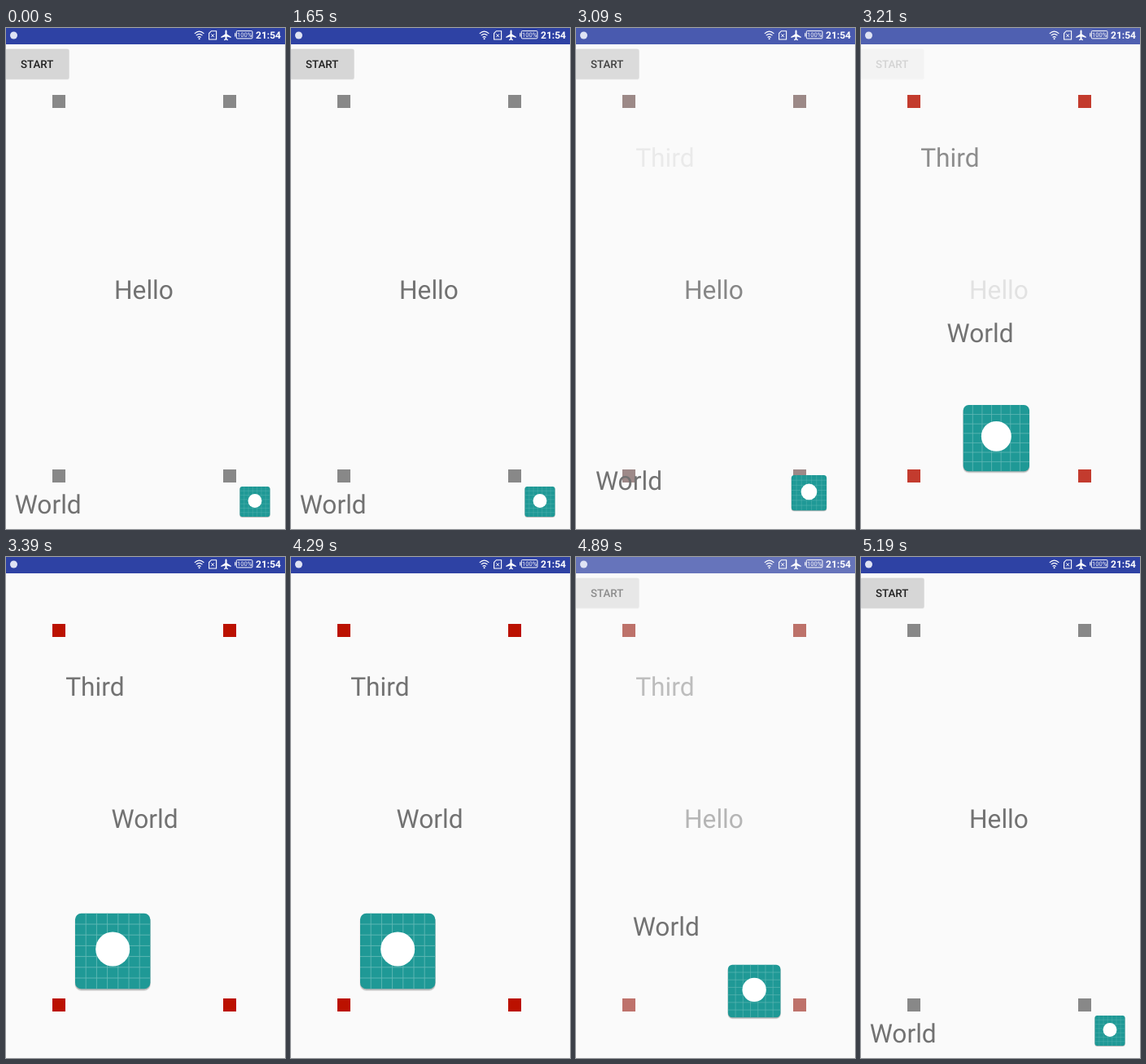
Animation of 343x614 px, one loop 6.75 s. Source, as an HTML page:

```html
<!DOCTYPE html>
<html lang="en">
<head>
<meta charset="utf-8">
<title>Shared element transition</title>
<style>
html, body { margin: 0; width: 100%; height: 100%; overflow: hidden; background: #fafafa; }
svg { display: block; width: 100vw; height: 100vh; }
text { font-family: Roboto, sans-serif; text-rendering: geometricPrecision; }
.big { font-size: 31.7px; fill: #727272; }
</style>
</head>
<body>
<svg viewBox="0 0 343 614">
  <defs>
    <g id="page">
      <rect width="343" height="20" fill="#2e42a4"/>
      <path d="M57 82h16v16h-16zM267 82h16v16h-16zM57 541h16v16h-16zM267 541h16v16h-16z"/>
    </g>
  </defs>
  <rect width="343" height="614" fill="#fafafa"/>

  <g id="first">
    <use href="#page" fill="#888"/>
    <rect x="-1" y="25.5" width="79" height="38" rx="2.5" opacity=".05"/>
    <rect x="-.5" y="26" width="78" height="36.7" rx="2" opacity=".1"/>
    <rect x="0" y="25.7" width="77" height="36" rx="2" fill="#d6d6d6"/>
    <text x="38.2" y="49" font-size="13.3" font-weight="500" text-anchor="middle" fill="#212121">START</text>
    <text class="big" x="133" y="332.2">Hello</text>
  </g>

  <g id="second">
    <use href="#page" fill="#bb1100"/>
    <text class="big" x="73.2" y="170.4">Third</text>
  </g>

  <g id="status" fill="none" stroke="#fff">
    <circle cx="9.5" cy="9" r="4.5" fill="#dfe3f4" stroke="none"/>
    <path d="M231.8 6.8q5.8-5.4 11.6 0M233.7 9.2q3.9-3.7 7.8 0M235.6 11.5q2-1.9 4 0" stroke-width="1.1"/>
    <circle cx="237.6" cy="13.2" r="1" fill="#fff" stroke="none"/>
    <path d="M252.4 3.7h6.2v10.3h-9v-7.5z" stroke-width="1.1"/>
    <path d="M252.3 7.4l3.6 3.8M255.9 7.4l-3.6 3.8"/>
    <path d="M270.5 2.6q1 0 1 1.3v3.6l5.2 3.2v1.3l-5.2-1.5v2.7l1.5 1.1v1l-2.5-.7-2.5.7v-1l1.5-1.1v-2.7l-5.2 1.5v-1.3l5.2-3.2v-3.6q0-1.3 1-1.3z" fill="#fff" stroke="none"/>
    <rect x="283.3" y="3.6" width="19.6" height="9.3" rx="1"/>
    <path d="M281.8 6.2v4.2" stroke-width="1.2"/>
    <g fill="#fff" stroke="none">
      <text x="293.2" y="11" font-size="7.6" text-anchor="middle">100%</text>
      <text x="322.5" y="13" font-size="12" font-weight="700" text-anchor="middle">21:54</text>
    </g>
  </g>

  <text id="world" class="big">World</text>

  <g id="tile">
    <rect x="-46.7" y="-44.5" width="93.4" height="93.4" rx="8" opacity=".1"/>
    <rect x="-46.2" y="-44.7" width="92.4" height="92.4" rx="7.5" opacity=".2"/>
    <rect x="-46.2" y="-46.2" width="92.4" height="92.4" rx="7.5" fill="#1f9996"/>
    <path id="grid" stroke="#62b9b6" stroke-width=".9"/>
    <circle cy="-2.5" r="21" fill="#fff"/>
  </g>
</svg>
<script>
const LOOP = 6750, STEP = 30;
const el = id => document.getElementById(id);
const mix = (a, b, p) => a + (b - a) * p;

let lines = '';
for (let i = 1; i < 7; i++) {
  const c = (i - 3.5) * 13.2;
  lines += `M${c} -46.2v92.4M-46.2 ${c}h92.4`;
}
el('grid').setAttribute('d', lines);

// Cubic bezier (0.4, 0, 0.2, 1), solved by bisection
function ease(x) {
  if (x <= 0) return 0;
  if (x >= 1) return 1;
  let lo = 0, hi = 1;
  for (let i = 0; i < 24; i++) {
    const s = (lo + hi) / 2, r = 1 - s;
    if (1.2 * s * r * r + 0.6 * s * s * r + s ** 3 < x) lo = s;
    else hi = s;
  }
  return 3 * lo * lo - 2 * lo ** 3;
}

// The leaving page fades slightly ahead of the entering one
const leave = p => 1 - p ** 0.85;

function render(ms) {
  const t = Math.floor(ms % LOOP / STEP) * STEP;
  const out = ease((t - 3023) / 360);
  const back = ease((t - 4746) / 410);
  const p = out - back;

  el('first').setAttribute('opacity', back || leave(out));
  el('second').setAttribute('opacity', back ? leave(back) : out);
  el('world').setAttribute('transform',
    `translate(${mix(10.7, 129.5, p)} ${mix(595.1, 332.1, p)})`);
  el('tile').setAttribute('transform',
    `translate(${mix(306, 131.2, p)} ${mix(580.5, 483, p)}) scale(${mix(37.3, 93, p) / 93})`);
}

const start = performance.now();
function tick() {
  render(performance.now() - start);
  requestAnimationFrame(tick);
}
render(0);
requestAnimationFrame(tick);
</script>
</body>
</html>
```
